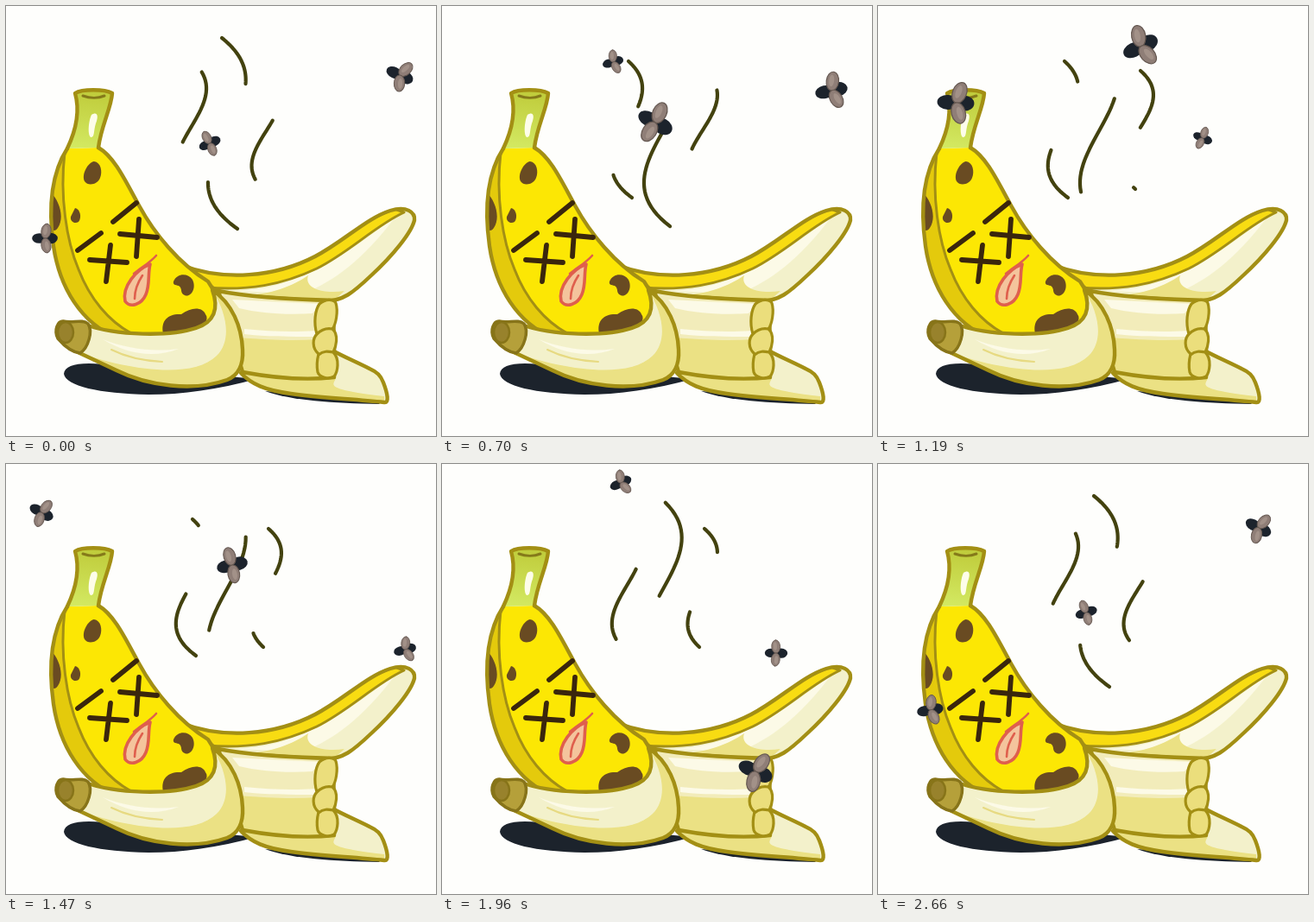
An HTML page with a canvas that plays this animation: 498 by 498 pixels, repeating every 2.73 s.

```html
<!DOCTYPE html>
<html>
<head>
<meta charset="utf-8">
<style>
  html, body { margin: 0; width: 100%; height: 100%; overflow: hidden; background: #fefefc; }
  canvas { display: block; width: 498px; height: 498px; }
</style>
</head>
<body>
<canvas id="stage" width="498" height="498"></canvas>
<script>
const ctx = document.getElementById('stage').getContext('2d');
const LOOP = 2730, STEP = 70, FLIES = 3, TAU = Math.PI * 2;
const OUTLINE = '#a38f14', CREAM = '#f3f1cb', PALE = '#fcfae7', SHADE = '#ebe184',
      YELLOW = '#fce704', GOLD = '#e4ca0c', BROWN = '#694b22', INK = '#3a260d',
      SMOKE = '#43420f', NAVY = '#1c232c', RED = '#df5f4d';

function shape(d, fill, stroke, width = 4.4) {
  const path = new Path2D(d);
  if (fill) { ctx.fillStyle = fill; ctx.fill(path); }
  if (stroke) { ctx.strokeStyle = stroke; ctx.lineWidth = width; ctx.stroke(path); }
}

function oval(x, y, rx, ry, fill, edge, width = 1) {
  ctx.beginPath();
  ctx.ellipse(x, y, rx, ry, 0, 0, TAU);
  ctx.fillStyle = fill;
  ctx.fill();
  if (edge) { ctx.strokeStyle = edge; ctx.lineWidth = width; ctx.stroke(); }
}

function filledInside(d, fill, details) {
  shape(d, fill);
  ctx.save();
  ctx.clip(new Path2D(d));
  details();
  ctx.restore();
}

function drawShadow() {
  shape('M67 426C68 414 90 411 130 417L290 432C245 444 205 450 165 450C108 449 69 440 67 426Z', NAVY);
  shape('M300 446L437 456L432 461C380 460 330 457 300 446Z', NAVY);
}

function drawBackPeel() {
  const peel = 'M203 300C252 319 312 314 358 290C392 272 417 246 445 237C464 231 474 239 473 248C470 262 448 289 423 312C402 332 390 342 368 342L250 334Z';
  filledInside(peel, CREAM, () => {
    shape('M262 330C320 330 372 306 452 243C412 296 380 318 345 333Z', PALE);
    shape('M270 336C310 334 332 324 350 312C345 326 365 334 392 330L375 345Z', SHADE);
    shape('M203 300C252 319 312 314 358 290C392 272 417 246 450 235L461 239C428 254 398 285 360 304C320 323 280 330 232 326', '#f8dc12', OUTLINE, 3);
  });
  shape(peel, null, OUTLINE);
}

function drawLowerPeels() {
  const lower = 'M272 425C284 438 300 445 330 449C365 454 402 455 438 459C444 460 442 449 437 436C434 428 430 424 421 420C405 412 391 406 378 399Z';
  filledInside(lower, CREAM, () => shape('M270 420L380 428C390 436 350 442 438 452V462L300 450Z', SHADE));
  shape(lower, null, OUTLINE);

  const middle = 'M246 330C285 338 335 340 381 341C377 370 382 400 380 430C345 434 306 430 274 424Z';
  filledInside(middle, '#f2ecba', () => {
    shape('M262 340L365 345L355 356C325 358 294 356 270 350Z', PALE);
    shape('M270 384C306 387 334 388 362 386V434L270 428Z', SHADE);
    shape('M276 374C306 377 334 378 358 376V383C330 383 300 383 276 380Z', PALE);
  });
  shape(middle, null, OUTLINE);
  shape('M363 345C370 339 379 339 382 344C385 354 382 369 378 374C386 381 382 395 379 401C387 409 384 424 380 429C373 433 363 430 361 424C359 414 361 407 362 403C354 396 355 385 360 380C356 367 358 352 363 345ZM360 380C367 373 373 373 378 374M362 404C368 399 373 400 379 401', '#ebde7c', OUTLINE, 3.2);
}

function drawBody() {
  const body = 'M71 165C51 196 49 235 55 278C62 326 87 367 128 384L236 379C248 360 247 337 234 319C200 298 172 264 154 231C139 204 126 175 107 164';
  filledInside(body, YELLOW, () => {
    shape('M68 166C62 210 70 270 84 305C97 339 119 365 145 379L90 390L40 290L50 180Z', GOLD);
    shape('M68 170C62 220 70 272 84 305C97 339 119 365 145 379', null, OUTLINE, 3);
    shape('M52 216C62 226 68 245 60 257C57 262 53 260 50 256Z', BROWN);
    shape('M182 379C179 364 188 356 203 357C214 349 227 348 231 357C236 363 228 370 224 378Z', BROWN);
    shape('M194 319C198 309 211 309 216 317C221 327 214 338 207 335C201 333 205 327 200 324C196 323 193 323 194 319Z', BROWN);
  });
  shape(body, null, OUTLINE);
  shape('M102 180C110 181 112 192 109 199C106 207 95 209 91 203C87 195 95 181 102 180Z', BROWN);
  shape('M80 234C86 235 88 245 84 250C79 253 74 249 75 244Z', BROWN);

  const stem = ctx.createLinearGradient(100, 98, 92, 165);
  stem.addColorStop(0, '#bfcb3a');
  stem.addColorStop(1, '#d3e962');
  shape('M71 165C80 146 86 122 80 101C88 96 114 96 123 101C122 118 110 139 107 164', stem, OUTLINE);
  shape('M89 104C97 107 107 107 114 104', null, '#857a1a', 3);
  shape('M99 126C105 122 108 126 104 136C101 146 103 152 98 152C94 148 96 132 99 126Z', '#fdfde9');
}

function drawFace() {
  shape('M83 283L110 263M97 294L140 297M121 277L116 319M124 250L151 228M132 264L175 268M154 247L151 290', null, INK, 5.8);
  shape('M167 299C151 305 134 325 138 342C144 350 157 346 162 334C167 322 164 310 167 299Z', '#f4c49c', RED, 3.6);
  shape('M148 310C158 302 167 297 174 289M158 312C152 321 149 330 149 339', null, RED, 2.6);
}

function drawFrontPeel() {
  const peel = 'M92 369C128 382 190 383 220 373C241 366 247 351 239 329C262 344 273 372 274 398C275 415 269 428 256 433C217 447 164 440 128 422C109 413 94 406 79 399Z';
  filledInside(peel, CREAM, () => {
    shape('M80 400C135 420 215 434 244 405C262 387 256 355 238 328L290 340V450H130Z', SHADE);
    shape('M112 386C140 397 170 401 200 397C170 409 138 402 112 386Z', PALE);
    shape('M122 398C140 407 160 411 181 412', null, '#e7da82', 2);
  });
  shape(peel, null, OUTLINE);
  shape('M66 365C77 368 88 362 95 368C101 377 95 396 86 402C75 401 66 392 60 385C55 375 60 365 66 365Z', '#b5a03a', '#877419', 3.5);
  oval(69, 378, 9, 12, '#98822c', '#877419', 2.5);
}

// Each wisp climbs an S-shaped track from bottom to top; its two ends share one speed.
const wisps = [
  { bottom: 258, top: 37, bend: [268, 163, 343, 250], head: 426, length: 108, speed: 0.0813 },
  { bottom: 222, top: 64, bend: [220, 147, 275, 216], head: 237, length: 81, speed: 0.0588 },
  { bottom: 212, top: 75, bend: [298, 248, 357, 304], head: 270, length: 68, speed: 0.0503 }
];

function bezier([a, b, c, d], u) {
  const v = 1 - u;
  return v * v * v * a + 3 * u * v * (v * b + u * c) + u * u * u * d;
}

function drawWisps(time) {
  ctx.strokeStyle = SMOKE;
  ctx.lineWidth = 4.2;
  for (const { bottom, top, bend, head, length, speed } of wisps) {
    for (let cycle = 0; cycle < 3; cycle++) {
      const y = head - speed * (time + cycle * LOOP);
      const from = Math.min(bottom, y + length), to = Math.max(top, y);
      if (from - to < 1) continue;
      ctx.beginPath();
      for (let i = 0; i <= 24; i++) {
        const py = from + (to - from) * i / 24;
        ctx.lineTo(bezier(bend, (bottom - py) / (bottom - top)), py);
      }
      ctx.stroke();
    }
  }
}

// One closed flight shared by all flies, each a loop ahead of the next: x, y, size.
const beats = [0, 700, 1190, 1470, 1960, 2240];
const flight = [
  [45, 269, .9], [198, 65, .75], [90, 112, 1.3], [41, 56, .9], [207, 22, .8], [298, 26, .8],
  [456, 80, 1], [451, 98, 1.15], [376, 153, .7], [462, 215, .8], [387, 219, .8], [301, 262, .75],
  [236, 159, .8], [247, 135, 1.3], [304, 47, 1.3], [262, 117, 1.1], [363, 356, 1.25], [246, 357, 1.15]
];
const beatTime = i => Math.floor(i / beats.length) * LOOP + beats[(i + beats.length) % beats.length];
const stop = i => flight[(i + flight.length) % flight.length];

// Speed at a stop, weighted towards the nearer neighbour.
function slope(i, k) {
  const before = beatTime(i) - beatTime(i - 1), after = beatTime(i + 1) - beatTime(i);
  const arrive = (stop(i)[k] - stop(i - 1)[k]) / before, leave = (stop(i + 1)[k] - stop(i)[k]) / after;
  return (arrive * after + leave * before) / (before + after);
}

function flyAt(t) {
  let i = 0;
  while (beatTime(i + 1) <= t) i++;
  const span = beatTime(i + 1) - beatTime(i), u = (t - beatTime(i)) / span;
  return [0, 1, 2].map(k => {
    const a = stop(i)[k], b = stop(i + 1)[k];
    return bezier([a, a + slope(i, k) * span / 3, b - slope(i + 1, k) * span / 3, b], u);
  });
}

function drawFly(t) {
  const [x, y, size] = flyAt(t), phase = t / (LOOP * FLIES) * TAU;
  const spread = 1.4 + 0.25 * Math.sin(11 * phase);
  ctx.save();
  ctx.translate(x, y);
  ctx.rotate(0.5 * Math.sin(7 * phase));
  ctx.scale(size, size);
  oval(-7, 0, 9.5, 6.5, NAVY);
  oval(7, 0, 9.5, 7, NAVY);
  for (const side of [-1, 1]) {
    ctx.save();
    ctx.rotate(side * spread);
    oval(9.5, 0, 9.5, 6.2, '#8f7e77', '#655851');
    oval(10, -1, 6, 2.6, '#a29188');
    ctx.restore();
  }
  ctx.restore();
}

function render(now) {
  const time = Math.floor((now % LOOP) / STEP) * STEP;
  ctx.fillStyle = '#fefefc';
  ctx.fillRect(0, 0, 498, 498);
  ctx.lineCap = ctx.lineJoin = 'round';
  drawShadow();
  drawBackPeel();
  drawLowerPeels();
  drawBody();
  drawFace();
  drawFrontPeel();
  drawWisps(time);
  for (let n = 0; n < FLIES; n++) drawFly(time + n * LOOP);
}

const start = performance.now();
function tick() {
  render(performance.now() - start);
  requestAnimationFrame(tick);
}
tick();
</script>
</body>
</html>
```
